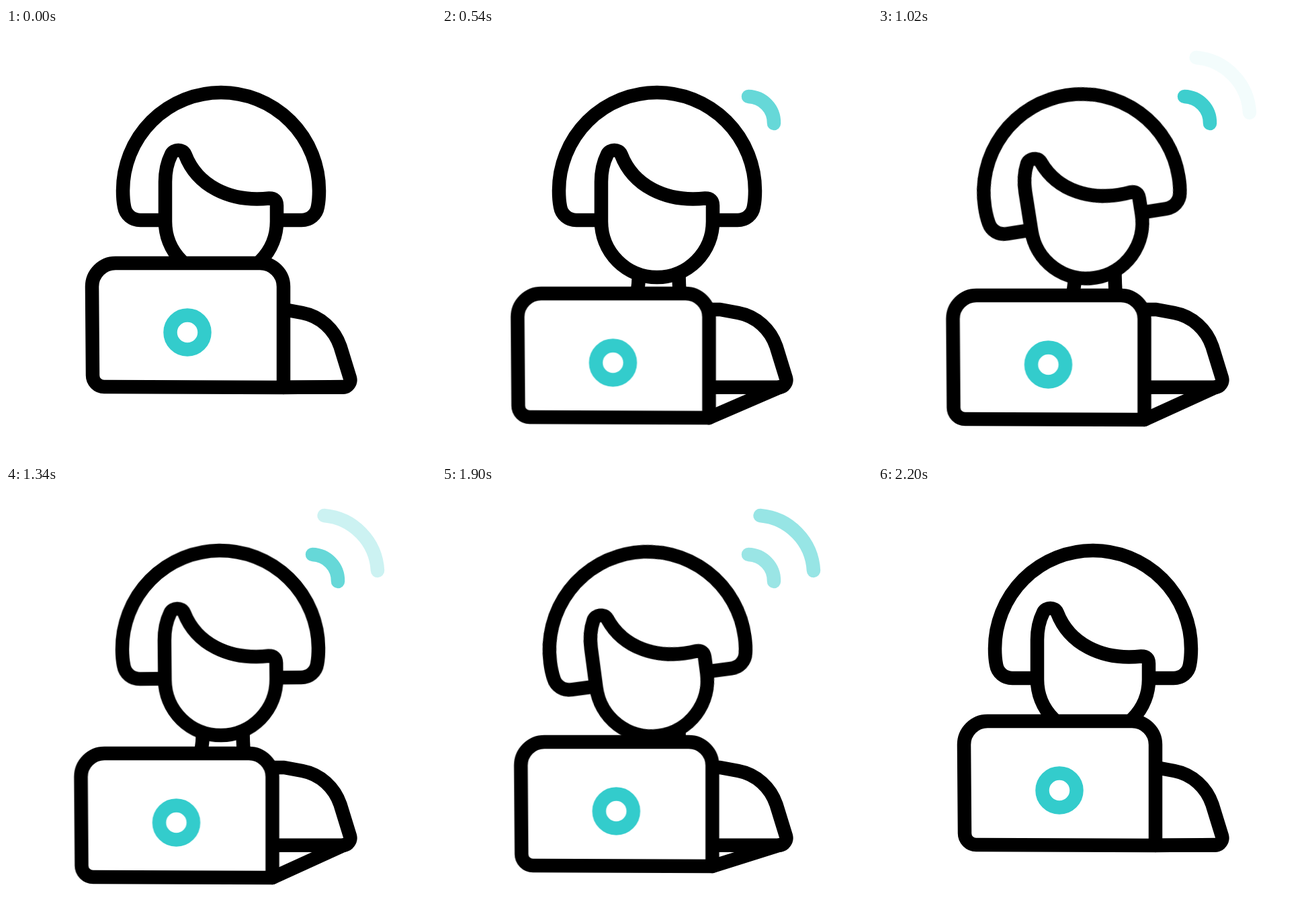
An HTML page that plays this animation: 640x640 px, repeating every 2.4 s.

```html
<!DOCTYPE html>
<html lang="en">
<head>
<meta charset="utf-8">
<title>Person at a laptop</title>
<style>
  html, body { margin: 0; width: 100%; height: 100%; overflow: hidden; background: #fff; }
  svg { display: block; width: 100vw; height: 100vh; }

  .ink { fill: #fff; stroke: #000; stroke-width: 20.5; stroke-linecap: round; stroke-linejoin: round; }
  .wave { fill: none; stroke: #3cc; stroke-width: 20.5; stroke-linecap: round; }
  .ring { fill: #fff; stroke: #3cc; stroke-width: 20.5; }

  .wave, .head, .laptop, .edge {
    animation: 2.4s cubic-bezier(.33, 0, .67, 1) infinite both;
  }
  .wave { animation-name: pulse; animation-timing-function: cubic-bezier(.2, 0, .8, 1); }
  .far { animation-delay: .2s; }
  .head { animation-name: nod; transform-origin: 326px 350px; }
  .laptop { animation-name: slide; }
  .edge { animation-name: stretch; }

  @keyframes pulse {
    0%, 16.667%, 33.333%, 50%, 66.667%, 83.333%, 100% { opacity: 0; }
    25%, 41.667%, 58.333%, 75% { opacity: 1; }
  }
  @keyframes nod {
    0%, 25%, 58.333%, 91.667%, 100% { transform: rotate(0deg); }
    41.667%, 75% { transform: rotate(-9deg); }
  }
  @keyframes slide {
    0%, 8.333%, 91.667%, 100% { transform: translate(0px, 0px); }
    25%, 70.833% { transform: translate(-16.5px, 48px); }
  }
  /* table edge: tied to the body at one end, to the laptop at the other */
  @keyframes stretch {
    0%, 8.333%, 91.667%, 100% { d: path("M504 534 L413 535"); }
    25%, 70.833% { d: path("M504 534 L396.5 583"); }
  }
</style>
</head>
<body>
<svg viewBox="0 0 640 640">
  <path class="wave" d="M456 102 A39 39 0 0 1 494 142"/>
  <path class="wave far" d="M473.5 44 A87 87 0 0 1 553 126"/>

  <g class="ink">
    <path d="M293 365 Q293 381 290 398 M352.5 360 Q352.5 381 354 398"/>
    <path d="M380 419 H414 L441 424 C468 429 489 449 497.5 474 L512 521 C514 528 508 534.7 502 534.7 H380"/>
    <path class="edge" d="M504 534 L413 535"/>
  </g>

  <g class="ink head">
    <path d="M237 286 H200 C188 286 178 278 176 266 Q174 256 174 242 A146 146 0 0 1 466 242 Q466 256 464 266 C462 278 452 286 440 286 H403"/>
    <path d="M403 288 A83 83 0 0 1 237 288 V229 C237 212 240 200 246 188 C250 180 263 180 266.5 188 C284 234 332 260 392 253.5 Q403 253.5 403 264 Z"/>
  </g>

  <g class="laptop">
    <path class="ink" d="M413 535 V385 A35 35 0 0 0 378 350 H163 A35 35 0 0 0 128 385 L129 517 A17 17 0 0 0 146 534 Z"/>
    <circle class="ring" cx="270" cy="453" r="25.5"/>
  </g>
</svg>
</body>
</html>
```
